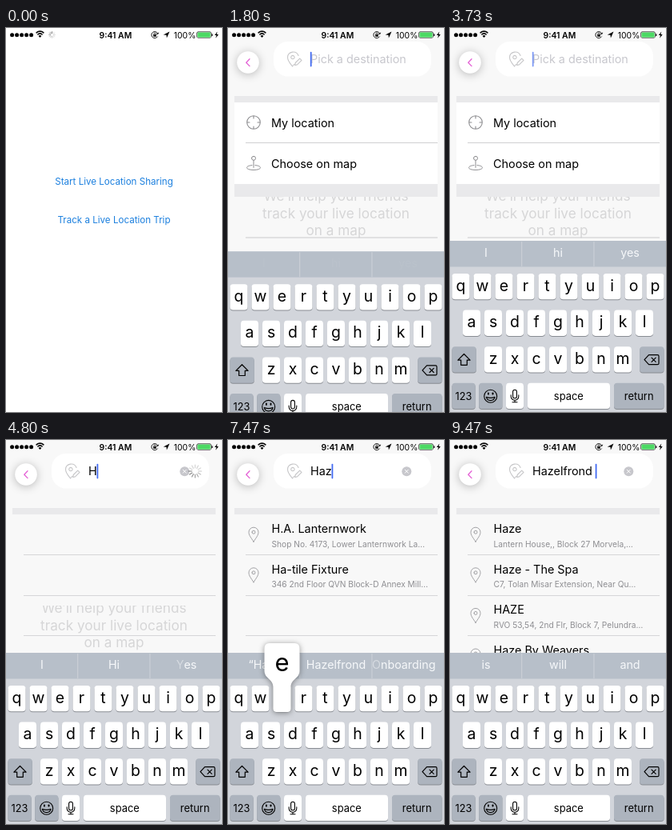
An HTML page with a canvas that plays this animation: 270x480 px, repeating every 9.54 s.

```html
<!DOCTYPE html>
<html lang="en">
<head>
<meta charset="utf-8">
<title>Pick a destination</title>
<style>
html, body { margin: 0; width: 100%; height: 100%; overflow: hidden; background: #fff; }
canvas { display: block; width: 270px; height: 480px; }
</style>
</head>
<body>
<canvas id="stage"></canvas>
<script>
const canvas = document.getElementById('stage');
const ctx = canvas.getContext('2d');
const W = 270, H = 480, LOOP = 9540, FPS = 15;
const KEYBOARD_TOP = 266, LIST_TOP = 93, ROW = 50.6, TAU = Math.PI * 2;
const dpr = window.devicePixelRatio || 1;
canvas.width = W * dpr;
canvas.height = H * dpr;

// Timelines: [start time, value]
const TYPED = [[0, ''], [4660, 'H'], [5260, 'Ha'], [5730, 'Haz'], [7590, 'Haze'], [8930, 'Hazelfrond ']];
const HINTS = [
  [0, ['I', 'hi', 'yes']],
  [4190, ['I', 'Hi', 'Yes']],
  [5390, ['“Ha”', 'Have', 'Has']],
  [5930, ['“Haz”', 'Hazelfrond', 'Onboarding']],
  [7720, ['“Haze”', 'Hazelfrond', 'Onboarding']],
  [9060, ['is', 'will', 'and']]
];
const FIRST_RESULTS = [
  ['H.A. Lanternwork', 'Shop No. 4173, Lower Lanternwork La…'],
  ['Ha-tile Fixture', '346 2nd Floor QVN Block-D Annex Mill…']
];
const NEXT_RESULTS = [
  ['Haze', 'Lantern House,, Block 27 Morvela,…'],
  ['Haze - The Spa', 'C7, Tolan Misar Extension, Near Qu…'],
  ['HAZE', 'RVO 53,54, 2nd Flr, Block 7, Pelundra…'],
  ['Haze By Weavers', '']
];
const RESULTS = [[0, []], [6530, FIRST_RESULTS], [8395, NEXT_RESULTS]];
// Intervals: [from, to, value]
const PRESSES = [[4530, 4660, 'h'], [5130, 5260, 'a'], [5590, 5730, 'z'], [7465, 7590, 'e']];
const LOADING = [[4660, 6530], [7590, 8395], [8930, 9465]];
const CARET = [[1595, 2130, 1], [4190, 5930, 1], [5930, 6470, 0], [7465, 8470, 1], [8470, 8530, 0.4], [8530, 8865, 0], [8865, LOOP, 1]];

const latest = (list, t) => list.filter(e => e[0] <= t).pop()[1];
const during = (list, t) => list.find(e => t >= e[0] && t < e[1]);
const clamp = v => Math.max(0, Math.min(1, v));

function setFont(size, weight = 400) {
  ctx.font = `${weight} ${size}px Inter, "Open Sans", sans-serif`;
}

function text(str, x, y, size, color, align = 'left', weight = 400) {
  setFont(size, weight);
  ctx.textAlign = align;
  ctx.fillStyle = color;
  ctx.fillText(str, x, y);
}

function rect(x, y, w, h, color) {
  ctx.fillStyle = color;
  ctx.fillRect(x, y, w, h);
}

function round(x, y, w, h, r, color) {
  ctx.beginPath();
  ctx.roundRect(x, y, w, h, r);
  ctx.fillStyle = color;
  ctx.fill();
}

function disc(x, y, r, color) {
  ctx.beginPath();
  ctx.arc(x, y, r, 0, TAU);
  ctx.fillStyle = color;
  ctx.fill();
}

function stroke(path, color, width = 1, x = 0, y = 0) {
  ctx.save();
  ctx.translate(x, y);
  ctx.strokeStyle = color;
  ctx.lineWidth = width;
  ctx.lineCap = ctx.lineJoin = 'round';
  ctx.stroke(new Path2D(path));
  ctx.restore();
}

function fill(path, color, x = 0, y = 0) {
  ctx.save();
  ctx.translate(x, y);
  ctx.fillStyle = color;
  ctx.fill(new Path2D(path));
  ctx.restore();
}

function withShadow(color, blur, dy, draw) {
  ctx.save();
  ctx.shadowColor = color;
  ctx.shadowBlur = blur * dpr;
  ctx.shadowOffsetY = dy * dpr;
  draw();
  ctx.restore();
}

function spinner(x, y, inner, outer, width, t) {
  const head = Math.floor(t / 1000 * 12);
  ctx.save();
  ctx.lineWidth = width;
  ctx.lineCap = 'round';
  for (let i = 0; i < 12; i++) {
    const a = i / 12 * TAU - TAU / 4;
    const age = ((head - i) % 12 + 12) % 12;
    ctx.strokeStyle = `rgba(90,90,90,${Math.max(0.25, 0.8 - age * 0.08)})`;
    ctx.beginPath();
    ctx.moveTo(x + Math.cos(a) * inner, y + Math.sin(a) * inner);
    ctx.lineTo(x + Math.cos(a) * outer, y + Math.sin(a) * outer);
    ctx.stroke();
  }
  ctx.restore();
}

function statusBar(t) {
  for (let i = 0; i < 5; i++) disc(7.6 + i * 6, 8.7, 2.5, '#000');
  stroke('M-4.4 -3.1A6.6 6.6 0 0 1 4.4 -3.1M-2.6 -.9A4 4 0 0 1 2.6 -.9', '#000', 1.6, 42.5, 8.9);
  fill('M-1.9 1Q0 -.7 1.9 1L0 3.2Z', '#000', 42.5, 8.9);
  if (t < 60) spinner(57.5, 8.5, 2, 4, 0.8, t);
  text('9:41 AM', 136.9, 12.5, 10.4, '#000', 'center', 600);
  stroke('M3.6 -2A4.1 4.1 0 1 0 3.4 2.3M2.3 -1.3L3.9 -.9L4.5 -2.5', '#000', 0.9, 186, 8.6);
  rect(184.2, 8.1, 3.6, 2.7, '#000');
  stroke('M-1.1 0V-1A1.1 1.1 0 0 1 1.1 -1V0', '#000', 0.7, 186, 8.1);
  fill('M204.5 4.6L200.9 12.4L200.5 8.7L196.7 8.4Z', '#000');
  text('100%', 209.8, 12.5, 10.4, '#000');
  round(238.4, 4.6, 18.2, 8, 1.8, '#000');
  round(239, 5.2, 17, 6.8, 1.3, '#fff');
  round(239.4, 5.5, 16.2, 6.2, 1, '#4cd964');
  round(257.2, 7.2, 1.2, 2.8, 0.6, '#000');
  fill('M264.3 4.6L260.8 9H263L262.1 12.7L265.7 7.9H263.4Z', '#000');
}

function home(t) {
  rect(0, 0, W, H, '#fff');
  ctx.globalAlpha = t < 525 || t >= 730 ? 1 : t < 665 ? 0.25 : 0.6;
  text('Start Live Location Sharing', 135, 196.1, 11.6, '#1b7fde', 'center');
  ctx.globalAlpha = 1;
  text('Track a Live Location Trip', 135, 244.2, 11.6, '#1b7fde', 'center');
}

function caretAlpha(t) {
  const forced = during(CARET, t);
  if (forced) return forced[2];
  const phase = (t + 335) % 1000;
  return phase < 460 ? clamp((phase + 65) / 195) : clamp(1 - (phase - 400) / 260);
}

function searchField(t) {
  const typed = latest(TYPED, t);
  round(57, 17, 197, 43.5, 18, '#fff');
  stroke('M-2 9C-5 5 -8 2 -8 -2.5A7 7 0 0 1 5.5 -4.5M-2 9L0 6.5', '#c6c6c8', 1.1, 82.5, 39);
  stroke('M-3.8 -2.4A2.2 2.2 0 1 1 .6 -2.4A2.2 2.2 0 1 1 -3.8 -2.4M1 7.5L1.8 4.5L7.2 -.9L9.5 1.4L4 6.9Z', '#c6c6c8', 1.1, 82.5, 39);
  text(typed || 'Pick a destination', 103, 44.2, 14.4, typed ? '#000' : '#c7c7cd');
  const caretX = typed ? 102.8 + ctx.measureText(typed).width : 102.8;
  ctx.globalAlpha = caretAlpha(t);
  round(caretX, 29.8, 1.8, 18.6, 0.8, '#426bf2');
  ctx.globalAlpha = 1;
  if (!typed) return;
  disc(223.3, 39.2, 6, '#c7c7cc');
  stroke('M-2 -2L2 2M2 -2L-2 2', '#fff', 1, 223.3, 39.2);
  if (during(LOADING, t)) spinner(236.4, 39, 4.2, 8, 1.2, t);
}

function backButton() {
  withShadow('rgba(0,0,0,.26)', 12, 1.5, () => disc(25, 43, 13.8, '#fff'));
  stroke('M27 38.8L22.8 43.2L27 47.6', '#e45fd5', 1.3);
}

function menu() {
  rect(8, LIST_TOP, 254, 102, '#fff');
  rect(8, 195, 254, 16, '#e9e9eb');
  rect(22, 143, 240, 1, '#d0d0d2');
  rect(22, 261.5, 240, 1, '#cbcbcd');
  stroke('M-8.3 0A8.3 8.3 0 1 1 8.3 0A8.3 8.3 0 1 1 -8.3 0M0 -8.3V-5M0 8.3V5M-8.3 0H-5M8.3 0H5', '#8d8d90', 1.1, 32, 118);
  stroke('M-2.5 -6.2A2.5 2.5 0 1 1 2.5 -6.2A2.5 2.5 0 1 1 -2.5 -6.2M0 -3.6V5.4M-2 2.6C-11 3.2 -11 8.4 0 8.4S11 3.2 2 2.6', '#8d8d90', 1, 32, 169);
  text('My location', 54, 124, 14.4, '#000');
  text('Choose on map', 54, 174.8, 14.4, '#000');
}

function resultRow([title, detail], i) {
  const y = LIST_TOP + 25.2 + i * ROW;
  stroke('M0 9C-3 4 -6 1 -6 -3A6 6 0 0 1 6 -3C6 1 3 4 0 9ZM-2 -3A2 2 0 1 1 2 -3A2 2 0 1 1 -2 -3', '#9a9a9d', 0.9, 32, y);
  text(title, 54.5, y - 2, 14.4, '#000');
  text(detail, 54.5, y + 15.5, 10.2, '#8e8e92');
}

function introText(top) {
  ctx.save();
  ctx.beginPath();
  ctx.rect(0, top, W, H);
  ctx.clip();
  ['We’ll help your friends', 'track your live location', 'on a map'].forEach((line, i) =>
    text(line, 135, 215.7 + i * 21.8, 17.2, '#d6d6d7', 'center'));
  ctx.restore();
}

function picker(t) {
  const choosing = t < 4660;
  const results = latest(RESULTS, t);
  rect(0, 0, W, H, '#f8f8f8');
  if (!results.length) introText(choosing ? 211 : 207);
  rect(8, 85, 254, 8, '#e9e9eb');
  if (choosing) {
    menu();
  } else {
    for (let i = 1; i <= 3; i++) rect(22, Math.round(LIST_TOP + i * ROW - 0.6), 240, 1, '#d6d6d8');
    results.forEach(resultRow);
  }
  searchField(t);
  backButton();
}

function suggestions(t) {
  const y = KEYBOARD_TOP;
  rect(0, y, W, 32.5, '#b7bfc9');
  if (t >= 8865 && t < 9060) rect(90, y, 90, 32.5, '#d2d5db');
  rect(89.3, y + 1, 0.9, 31, '#d0d5dc');
  rect(179.5, y + 1, 0.9, 31, '#d0d5dc');
  const shown = clamp((t - 1790) / 200);
  const color = '#f6f8fa';
  setFont(14.3);
  latest(HINTS, t).forEach((word, i) => {
    ctx.globalAlpha = shown;
    const width = ctx.measureText(word).width;
    let x = 45 + i * 90 - width / 2;
    if (i === 2 && width > 76) x = 180;
    if (i === 2 && /^[A-Z]/.test(word)) {
      ctx.globalAlpha = shown * 0.5;
      text(word[0], x, y + 20.2, 14.3, color);
      x += ctx.measureText(word[0]).width;
      word = word.slice(1);
      ctx.globalAlpha = shown;
    }
    text(word, x, y + 20.2, 14.3, color);
  });
  ctx.globalAlpha = 1;
}

function key(x, y, w, color = '#fff') {
  round(x, y + 1, w, 32.3, 3.8, '#888c92');
  round(x, y, w, 32.3, 3.8, color);
}

function callout(letter, x, y) {
  const path = `M${x - 16} ${y - 53}H${x + 16}Q${x + 22} ${y - 53} ${x + 22} ${y - 46}V${y - 19}` +
    `C${x + 22} ${y - 8} ${x + 11} ${y - 9} ${x + 11} ${y + 2}V${y + 29}Q${x + 11} ${y + 33} ${x + 7} ${y + 33}` +
    `H${x - 7}Q${x - 11} ${y + 33} ${x - 11} ${y + 29}V${y + 2}` +
    `C${x - 11} ${y - 9} ${x - 22} ${y - 8} ${x - 22} ${y - 19}V${y - 46}Q${x - 22} ${y - 53} ${x - 16} ${y - 53}Z`;
  withShadow('rgba(0,0,0,.42)', 7, 1, () => fill(path, '#fff'));
  text(letter, x, y - 17.6, 31, '#000', 'center');
}

function keyboard(t) {
  const rise = 168 * Math.pow(1 - clamp((t - 1600) / 350), 3);
  const shift = t >= 4190 && t < 4660;
  const press = during(PRESSES, t);
  const rowY = i => 307 + i * 45.6;
  const dark = '#adb4be';
  let popup;
  ctx.save();
  ctx.translate(0, rise);
  rect(0, 298, W, 182, '#d2d5db');
  suggestions(t);
  ['qwertyuiop', 'asdfghjkl', 'zxcvbnm'].forEach((row, r) => {
    [...row].forEach((letter, i) => {
      const x = [13.5, 27, 54][r] + i * 27;
      const y = rowY(r);
      const label = shift ? letter.toUpperCase() : letter;
      key(x - 11, y, 22);
      if (press && press[2] === letter) popup = [label, x, y];
      else text(label, x, y + (shift ? 23 : 21.6), 19.4, '#000', 'center');
    });
  });
  const y3 = rowY(2), y4 = rowY(3);
  key(2.5, y3, 30.3, shift ? '#fff' : dark);
  const arrow = 'M0 -7.3L7.6 .4H3.8V6.5H-3.8V.4H-7.6Z';
  if (shift) fill(arrow, '#000', 17.5, y3 + 16.6);
  stroke(arrow, '#000', 1.2, 17.5, y3 + 16.6);
  key(237.2, y3, 30.3, dark);
  stroke('M-9 0L-3.5 -6H7.5Q9 -6 9 -4.5V4.5Q9 6 7.5 6H-3.5ZM0 -2.6L5.2 2.6M5.2 -2.6L0 2.6', '#000', 1.2, 252, y3 + 16.5);
  key(2.5, y4, 29.2, dark);
  text('123', 17, y4 + 21.2, 12.8, '#000', 'center');
  key(36.2, y4, 29.2, dark);
  stroke('M-8 0A8 8 0 1 1 8 0A8 8 0 1 1 -8 0M-5.4 1Q0 3.4 5.4 1A5.5 5.5 0 0 1 -5.4 1Z', '#000', 1.1, 50.7, y4 + 16.4);
  round(47, y4 + 11.6, 1.8, 3.2, 0.9, '#000');
  round(52.6, y4 + 11.6, 1.8, 3.2, 0.9, '#000');
  key(70, y4, 22);
  stroke('M-2.4 -5.2A2.4 2.4 0 0 1 2.4 -5.2V.6A2.4 2.4 0 0 1 -2.4 .6ZM-4.8 -1V.6A4.8 4.8 0 0 0 4.8 .6V-1M0 5.4V8M-3 8H3', '#000', 1.1, 81, y4 + 16);
  key(97, y4, 103);
  text('space', 148.3, y4 + 20.8, 12.9, '#000', 'center');
  key(205, y4, 62.5, dark);
  text('return', 236.2, y4 + 20.8, 12.9, '#000', 'center');
  if (popup) callout(...popup);
  ctx.restore();
}

function draw(t) {
  ctx.setTransform(dpr, 0, 0, dpr, 0, 0);
  if (t < 1595) {
    home(t);
  } else {
    picker(t);
    keyboard(t);
  }
  statusBar(t);
}

// The screen refreshes at a fixed, low frame rate.
function frame() {
  const t = performance.now() % LOOP;
  draw(Math.floor((t + 5) * FPS / 1000) * 1000 / FPS);
  requestAnimationFrame(frame);
}
frame();
</script>
</body>
</html>
```
